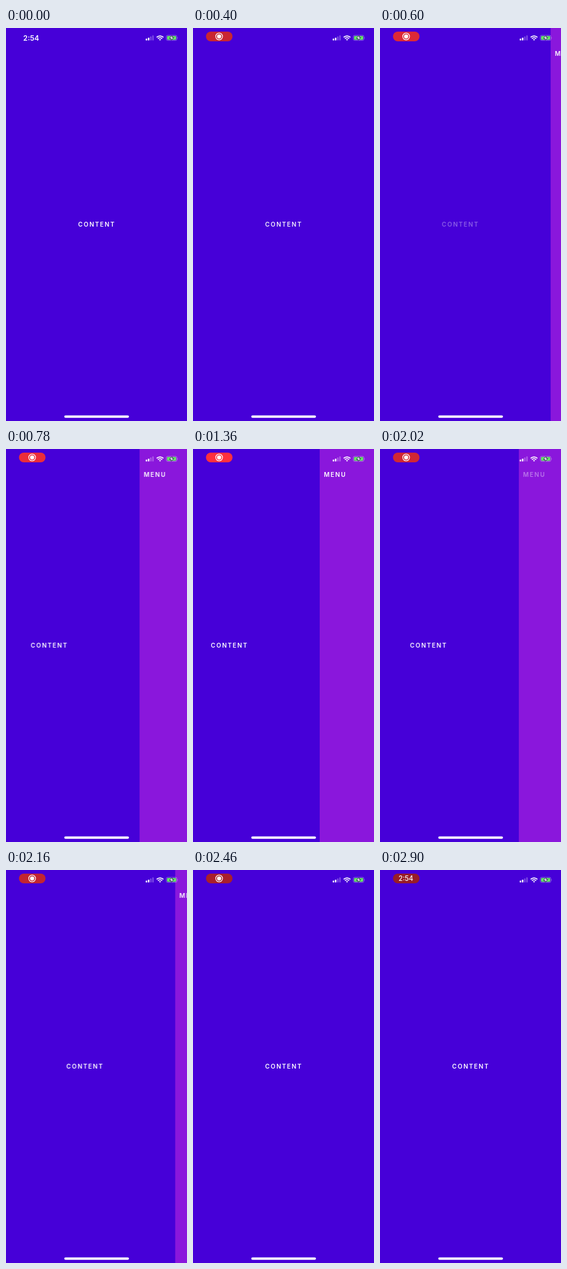
These frames come from a looping animation (300x649 px, 2.92 s). An HTML page:

```html
<!DOCTYPE html>
<html lang="en">
<head>
<meta charset="utf-8">
<title>Side menu</title>
<style>
  html, body { margin: 0; width: 100%; height: 100%; overflow: hidden; background: #4600d8; }
  svg { display: block; width: 300px; height: 649px; }
  text { font-family: Inter, "Liberation Sans", sans-serif; font-weight: 600; fill: #fff; }
  .label { font-size: 10.2px; letter-spacing: 1.6px; }
</style>
</head>
<body>
<svg viewBox="0 0 300 649">
  <rect width="300" height="649" fill="#4600d8"/>
  <g id="slider">
    <text id="content" class="label" x="119.6" y="328.2">CONTENT</text>
    <rect x="300" width="100" height="649" fill="#8a17dc"/>
    <text id="menu" class="label" x="307.1" y="46.2">MENU</text>
  </g>

  <text id="clock" x="28.6" y="20.9" font-size="11.8">2:54</text>
  <g id="pill">
    <rect id="pillBody" x="21.5" y="6" width="44" height="16" rx="8" fill="#ff303e"/>
    <g id="record" fill="#fff">
      <circle cx="43.3" cy="14" r="5.6" fill="none" stroke="#fff" stroke-width="1.2"/>
      <circle cx="43.3" cy="14" r="3.4"/>
    </g>
    <text id="pillTime" x="30.8" y="18.2" font-size="11.2" style="font-weight:500">2:54</text>
  </g>

  <g fill="#fff">
    <rect x="231.6" y="17.4" width="2.4" height="3.2" rx=".6"/>
    <rect x="235.2" y="16" width="2.4" height="4.6" rx=".6"/>
    <g opacity=".3">
      <rect x="238.8" y="14.1" width="2.4" height="6.5" rx=".6"/>
      <rect x="242.4" y="12.2" width="2.4" height="8.4" rx=".6"/>
    </g>
  </g>
  <g fill="none" stroke="#fff" stroke-width="1.7">
    <path d="M249.7 15.4A8 8 0 0 1 260.9 15.4"/>
    <path d="M251.8 17.6A5 5 0 0 1 258.8 17.6"/>
    <path d="M253.5 18.9Q255.3 17.4 257.1 18.9L255.3 20.7Z" fill="#fff" stroke="none"/>
  </g>
  <g>
    <rect x="265.7" y="12" width="17.6" height="8.6" rx="2.3" fill="none" stroke="#fff" stroke-width=".8" stroke-opacity=".42"/>
    <path d="M284.2 14.9Q285.6 16.3 284.2 17.7Z" fill="#fff" opacity=".45"/>
    <rect x="266.9" y="13.2" width="15.2" height="6.2" rx="1.3" fill="#65e667"/>
    <path d="M275.4 12.6L271.6 16.8H274.2L273.4 20L277.3 15.8H274.6Z" fill="#fff" stroke="#180048" stroke-width="1.3" paint-order="stroke"/>
  </g>
  <rect x="96.6" y="639.8" width="107.2" height="3.9" rx="1.95" fill="#fff"/>
</svg>
<script>
const LOOP = 2920;
const OPEN = 480, CLOSE = 1890, SLIDE = 400;
const easeInOut = 'ease-in-out';

// Each step is [time in ms, value, easing to the next step].
function play(id, prop, steps) {
  const last = steps[steps.length - 1];
  const frames = [...steps, [LOOP, last[1]]].map(([time, value, easing = 'linear']) =>
    ({ offset: time / LOOP, [prop]: value, easing }));
  document.getElementById(id).animate(frames, { duration: LOOP, iterations: Infinity });
}

const shift = x => `translateX(${x}px)`;
play('slider', 'transform', [
  [0, shift(0)],
  [OPEN, shift(0), easeInOut], [OPEN + SLIDE, shift(-90)],
  [CLOSE, shift(-90), easeInOut], [CLOSE + SLIDE, shift(0)]
]);

// Touch feedback: dim while pressed, then recover.
const press = start => [
  [0, 1],
  [start - 110, 1, easeInOut], [start + 40, 0.2, easeInOut], [start + 290, 1]
];
play('content', 'opacity', press(OPEN));
play('menu', 'opacity', press(CLOSE));

// Recording badge
play('clock', 'opacity', [[0, 1], [20, 1], [180, 0], [LOOP - 1, 0], [LOOP - 1, 1]]);
play('pill', 'opacity', [[0, 0], [20, 0], [260, 1], [LOOP - 1, 1], [LOOP - 1, 0]]);
play('record', 'opacity', [[0, 1], [2520, 1, easeInOut], [2740, 0]]);
play('pillTime', 'opacity', [[0, 0], [2580, 0, easeInOut], [2800, 1]]);

const dark = [152, 28, 40], bright = [255, 48, 62];
function pulse(time) {
  const k = 0.5 + 0.5 * Math.cos(Math.PI * (time - 1250) / 1650);
  return `rgb(${dark.map((c, i) => Math.round(c + (bright[i] - c) * k))})`;
}
play('pillBody', 'fill', Array.from({ length: 30 }, (_, i) => [i * 100, pulse(i * 100)]));
</script>
</body>
</html>
```
